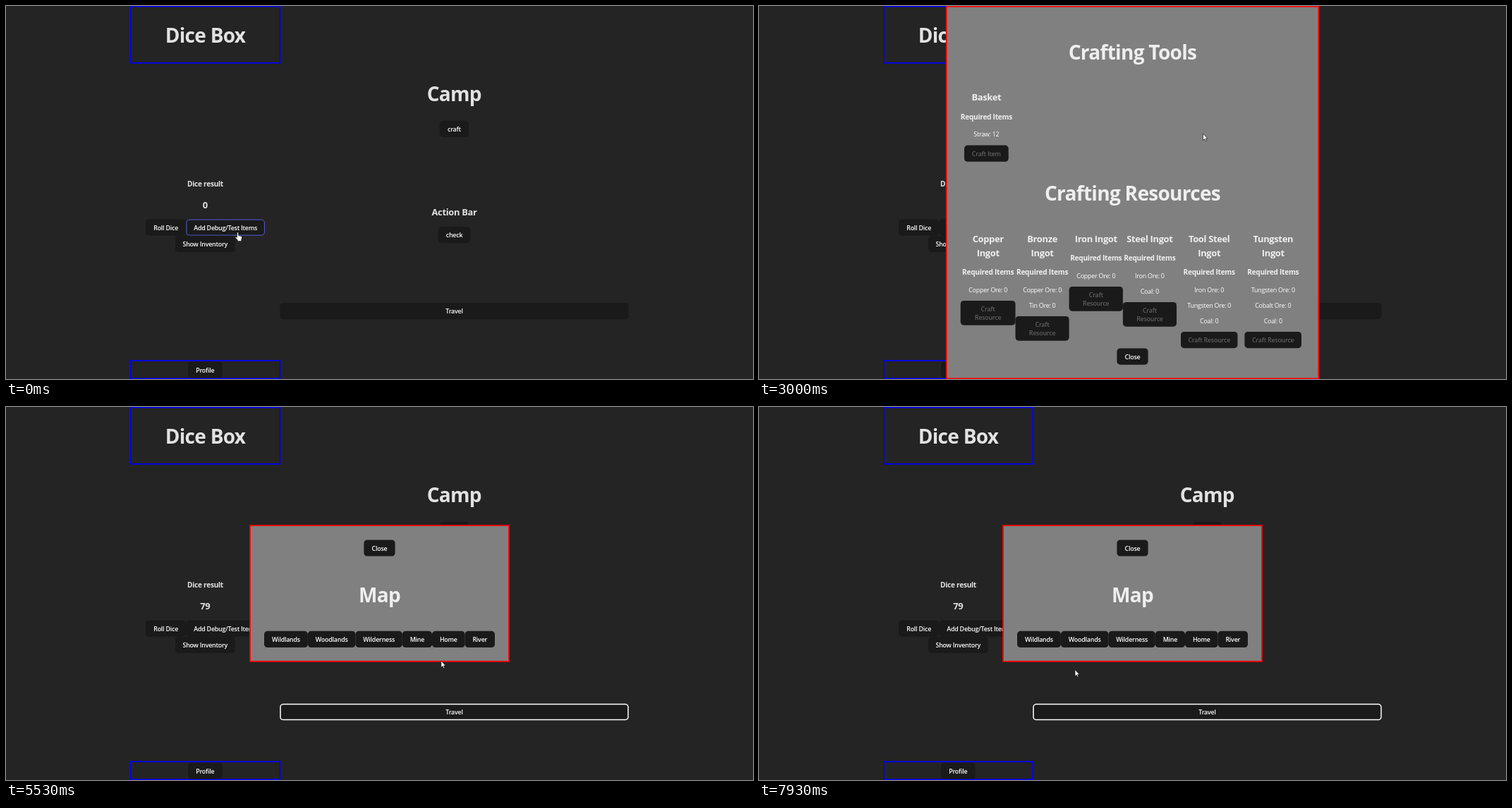
Recreate the animation shown at these times as an HTML page. Size 1059 by 529 pixels, loop 8 s.

```html
<!DOCTYPE html>
<html lang="en">
<head>
<meta charset="utf-8">
<title>Dice Box</title>
<style>
html, body { margin: 0; width: 100%; height: 100%; overflow: hidden; background: #242424; }
svg { display: block; }
text {
  font-family: "Open Sans", "Noto Sans", sans-serif;
  letter-spacing: -.025em;
  text-anchor: middle;
  fill: #fff;
  fill-opacity: .87;
}
.label { fill-opacity: 1; }
.disabled { fill-opacity: .3; }
.panel { fill: #808080; stroke: #f00; stroke-width: 1.8; }
.frame { fill: none; stroke: #00f; stroke-width: 1.7; }
.cursor { fill: #fff; stroke: #000; stroke-width: .6; stroke-linejoin: round; }
</style>
</head>
<body>
<svg width="1059" height="529" viewBox="0 0 1059 529">
  <g id="page">
    <rect class="frame" x="176.9" y=".6" width="211.4" height="80.2"/>
    <rect class="frame" x="176.9" y="502.9" width="211.4" height="25.4"/>
  </g>
  <g id="craft"><rect class="panel" x="265.7" y=".7" width="527.6" height="527.6"/></g>
  <g id="map"><rect class="panel" x="346" y="168" width="367" height="192.8"/></g>
  <path id="arrow" class="cursor" d="M0 0V9.3L2.1 7.5 3.5 10.6 4.9 10 3.6 6.9H6.4Z"/>
  <path id="hand" class="cursor" d="M-1 .8Q0-.6 1 .8V4.5L5 5.6Q6.3 6 6 8L5.2 10.5V12.6H-.2V11L-3.3 7.6Q-3.4 6-1.8 6.6L-1 7.4Z"/>
</svg>
<script>
const LOOP = 8000, STEP = LOOP / 120, FADE = 250;
const H1 = 28, H2 = 12.9, H3 = 10.1, BODY = 8.9;
const $ = id => document.getElementById(id);
const buttons = [];

function add(layer, tag, attrs, content = '') {
  const el = document.createElementNS('http://www.w3.org/2000/svg', tag);
  for (const key in attrs) el.setAttribute(key, attrs[key]);
  el.textContent = content;
  return $(layer).appendChild(el);
}

// y is the middle of the capitals
function text(layer, x, y, size, content, weight = 700, cls = '') {
  add(layer, 'text', { x, y: y + size * .36, 'font-size': size, 'font-weight': weight, class: cls }, content);
}

function button(layer, x, y, right, label, cls = 'label') {
  const lines = label.split('|'), w = right - x, h = lines.length > 1 ? 34.7 : 23.2;
  add(layer, 'rect', { x, y, width: w, height: h, rx: 4.6, fill: '#1a1a1a' });
  lines.forEach((line, i) =>
    text(layer, x + w / 2, y + h / 2 + .4 + (i - (lines.length - 1) / 2) * 12, BODY, line, 600, cls));
  const ring = add(layer, 'rect', { x: x + .6, y: y + .6, width: w - 1.2, height: h - 1.2, rx: 4.2, fill: 'none' });
  buttons.push({ layer, x, y, right, bottom: y + h, label, ring });
}

function recipe(x, y, name, items, left, right, action) {
  const lines = name.split('|');
  lines.forEach((line, i) => text('craft', x, y + 20 * i, H2, line));
  y += 20 * (lines.length - 1);
  text('craft', x, y + 27.5, H3, 'Required Items');
  items.forEach((item, i) => text('craft', x, y + 52.5 + 22 * i, BODY, item, 400, 'label'));
  button('craft', left, y + 46 + 22 * items.length, right, action, 'disabled');
}

text('page', 282.5, 41.5, H1, 'Dice Box');
text('page', 635.3, 125.2, H1, 'Camp');
text('page', 282.5, 252.7, H3, 'Dice result');
text('page', 282.3, 282, H2, '0');
const result = $('page').lastChild;
text('page', 635.5, 292.8, H2, 'Action Bar');
button('page', 198, 302.5, 255.3, 'Roll Dice');
button('page', 255.3, 302.5, 367, 'Add Debug/Test Items');
button('page', 240, 325.8, 324.6, 'Show Inventory');
button('page', 614.8, 162.8, 656, 'craft');
button('page', 612.8, 313, 658.2, 'check');
button('page', 388.4, 421, 882.6, 'Travel');
button('page', 258, 504.3, 306.6, 'Profile');

text('craft', 529.5, 65.8, H1, 'Crafting Tools');
text('craft', 529.5, 266.2, H1, 'Crafting Resources');
recipe(322.4, 129.6, 'Basket', ['Straw: 12'], 291, 353.7, 'Craft Item');
recipe(324.7, 330, 'Copper|Ingot', ['Copper Ore: 0'], 285.7, 363.5, 'Craft|Resource');
recipe(401.6, 330, 'Bronze|Ingot', ['Copper Ore: 0', 'Tin Ore: 0'], 363.5, 439.6, 'Craft|Resource');
recipe(477.8, 330, 'Iron Ingot', ['Copper Ore: 0'], 439.6, 515.9, 'Craft|Resource');
recipe(553.9, 330, 'Steel Ingot', ['Iron Ore: 0', 'Coal: 0'], 515.9, 592, 'Craft|Resource');
recipe(638.2, 330, 'Tool Steel|Ingot', ['Iron Ore: 0', 'Tungsten Ore: 0', 'Coal: 0'], 598, 678.5, 'Craft Resource');
recipe(728.8, 330, 'Tungsten|Ingot', ['Tungsten Ore: 0', 'Cobalt Ore: 0', 'Coal: 0'], 688.4, 769, 'Craft Resource');
button('craft', 507.4, 485.5, 551.6, 'Close');

button('map', 507.4, 188.4, 551.6, 'Close');
text('map', 529.5, 266.6, H1, 'Map');
const stops = [366, 427.9, 495.5, 561.8, 604, 650.6, 693];
['Wildlands', 'Woodlands', 'Wilderness', 'Mine', 'Home', 'River']
  .forEach((place, i) => button('map', stops[i], 317.8, stops[i + 1], place));

// pointer path: time, x, y
const path = [
  [0, 328.5, 321], [70, 328.5, 321], [730, 228, 316], [870, 228, 316], [1130, 227, 314.5],
  [1530, 227, 314.5], [1800, 330, 319], [2330, 606, 292.7], [2660, 634, 176], [2870, 634, 176],
  [3000, 629.5, 181], [3200, 619, 218], [3870, 535, 496], [4330, 535, 496], [4770, 598.5, 431],
  [5130, 598.5, 431], [5800, 626.7, 322], [6670, 626.7, 322], [7330, 500, 428], [7600, 500, 428],
  [7930, 448.5, 373], [LOOP, 440, 366]
];
const rings = [
  ['Roll Dice', 1265, 2730], ['craft', 2795, 2870], ['Close', 4125, 4270],
  ['Travel', 4795, 5995], ['Travel', 7460, LOOP]
];
const between = (t, from, to) => t >= from && t < to;
const layerAt = t => between(t, 2865, 4265) ? 'craft'
  : between(t, 4925, 5995) || t >= 7595 ? 'map' : 'page';

// velocity at a key; zero next to a rest
function slope(i, axis) {
  const a = path[i - 1], b = path[i], c = path[i + 1];
  if (!a || !c || a[1] === b[1] || b[1] === c[1]) return 0;
  return (c[axis] - a[axis]) / (c[0] - a[0]);
}

function pointerAt(t) {
  t = Math.max(0, t);
  const i = Math.max(1, path.findIndex(key => key[0] > t));
  const a = path[i - 1], b = path[i], span = b[0] - a[0], u = (t - a[0]) / span;
  const s = u * u * (3 - 2 * u);
  return [1, 2].map(k => a[k] + (b[k] - a[k]) * s
    + span * u * (1 - u) * (slope(i - 1, k) * (1 - u) - slope(i, k) * u));
}

function hit(t) {
  const [x, y] = pointerAt(t), layer = layerAt(t);
  return buttons.find(b => b.layer === layer && between(x, b.x, b.right) && between(y, b.y, b.bottom));
}

function draw(t) {
  const layer = layerAt(t), [x, y] = pointerAt(t);
  for (const id of ['craft', 'map']) $(id).style.display = layer === id ? '' : 'none';
  result.textContent = t < 1325 ? '0' : '79';

  const recent = Array.from({ length: 8 }, (_, i) => hit(t - FADE * i / 8));
  for (const b of buttons) {
    const focused = rings.some(([label, from, to]) => label === b.label && between(t, from, to));
    const hover = recent.filter(r => r === b).length / 8;
    b.ring.setAttribute('stroke', focused ? '#fff' : '#646cff');
    b.ring.setAttribute('stroke-width', focused ? 1.5 : 1);
    b.ring.setAttribute('stroke-opacity', focused ? 1 : hover * .85);
  }

  for (const id of ['arrow', 'hand']) {
    $(id).setAttribute('transform', `translate(${x} ${y})`);
    $(id).style.display = (id === 'hand') === !!recent[0] ? '' : 'none';
  }
}

const start = performance.now();
function tick() {
  const t = (performance.now() - start) % LOOP;
  draw(Math.min(Math.floor((t + 5) / STEP) * STEP, LOOP - STEP));
  requestAnimationFrame(tick);
}
tick();
</script>
</body>
</html>
```
